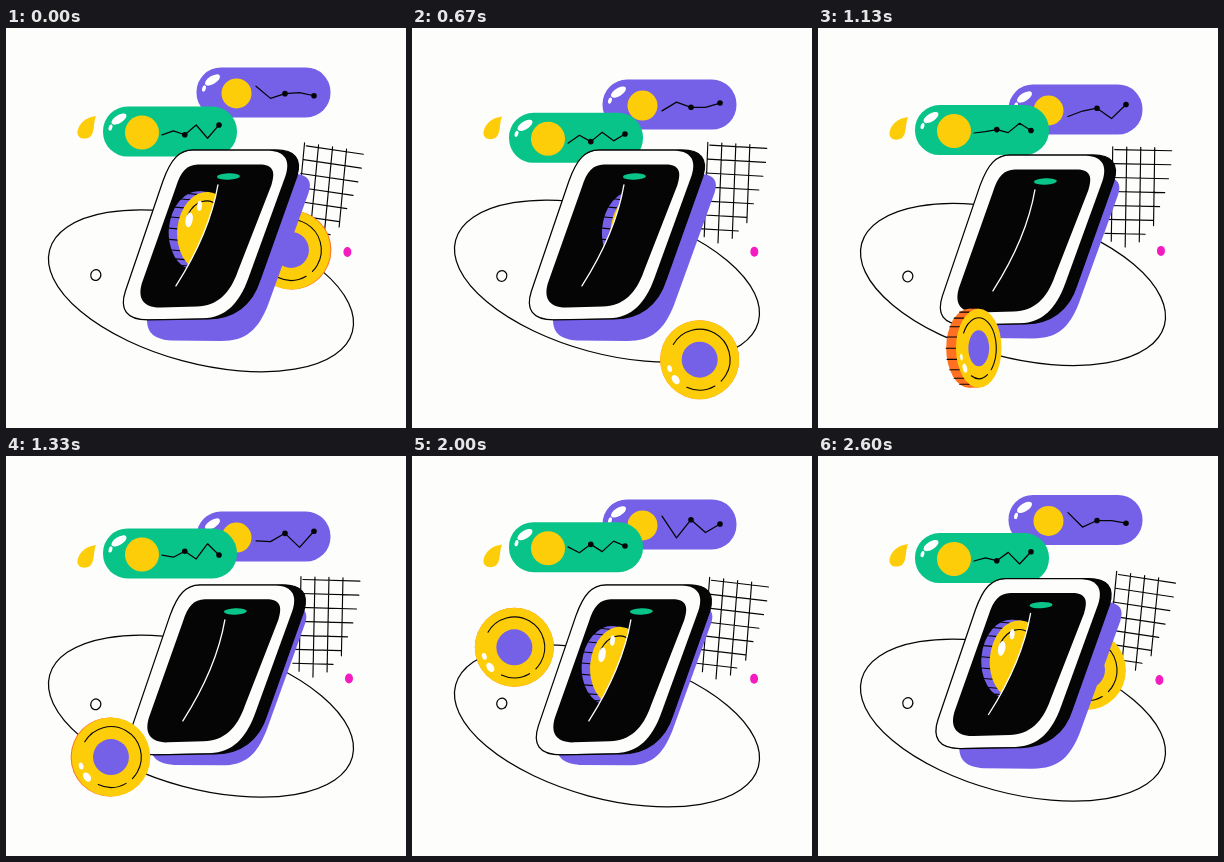
These frames come from a looping animation (400x400 px, 2670 ms). An HTML page with a canvas:

```html
<!DOCTYPE html>
<html lang="en">
<head>
<meta charset="utf-8">
<title>Coin orbit</title>
<style>
  html, body { margin: 0; width: 100%; height: 100%; overflow: hidden; background: #fdfdfc; }
  canvas { display: block; width: 400px; height: 400px; }
</style>
</head>
<body>
<canvas id="stage"></canvas>
<script>
const LOOP = 2670, STEPS = 40, TAU = Math.PI * 2;
const WHITE = '#fdfdfc', INK = '#050505', YELLOW = '#fecd0a', ORANGE = '#ff7022',
      PURPLE = '#7561e8', GREEN = '#08c488', PINK = '#f21cc0';

const canvas = document.getElementById('stage');
const dpr = window.devicePixelRatio || 1;
canvas.width = canvas.height = 400 * dpr;
const ctx = canvas.getContext('2d');
const rad = deg => deg * Math.PI / 180;

// Swings `cycles` times per loop, +1 at step `peak`
const wave = (k, peak, cycles = 1) => Math.cos((k - peak) / STEPS * TAU * cycles);

const shapes = {
  drop: 'M90 88.5C80 89.5 72.5 96.5 71.5 104C70.5 111 78.5 113 84 109.5C89 105 87 96 90 88.5Z',
  shadow: 'M290 146C302 147 306.5 153 302.5 165L262 277C252 302 240 313 215 313L165 312.5C150 311.5 141 306 141 292L190 150Z',
  body: 'M187 122H270C289 122 296 131 291 148L254 252C246 278 227 290.5 203 291L142 292C120 292 113.5 281 119.5 263L157 153C165 131 173 122.5 187 122Z',
  front: 'M187 122.5H260C278 122.5 285 131 279.5 148L242.5 250C233 276 220 289 197 290.5L142 291.5C120 291.5 114 281 119.5 263L157 153C165 131 173 123 187 122.5Z',
  screen: 'M192 136.5H252C267 136 270 143 265.5 157L232 243C224 266 211 278 191 278.5L155 279.5C137 280 131.5 270 136 255L170 159C175 143 181 137 192 136.5Z',
  slot: 'M212 157C207 186 193 222 170 258',
  slotLeft: 'M212 157C207 186 193 222 170 258L120 270V150Z'
};
for (const name in shapes) shapes[name] = new Path2D(shapes[name]);

function fill(path, color) { ctx.fillStyle = color; ctx.fill(path); }

function oval(x, y, rx, ry, color, turn = 0) {
  ctx.beginPath();
  ctx.ellipse(x, y, rx, ry, rad(turn), 0, TAU);
  ctx.fillStyle = color;
  ctx.fill();
}

function stroke(path, color = INK, width = 1.25) {
  ctx.strokeStyle = color;
  ctx.lineWidth = width;
  path ? ctx.stroke(path) : ctx.stroke();
}

function line(x0, y0, x1, y1) { ctx.moveTo(x0, y0); ctx.lineTo(x1, y1); }

function group(draw) { ctx.save(); draw(); ctx.restore(); }

// Each vertex bobs, lagging behind the one before it
function chart(k, top, { x, end, count, level, amp, peak, lag }) {
  const last = count - 1;
  const pts = Array.from({ length: count }, (_, i) => {
    const dot = i === 2 || i === last;
    const swing = (dot ? 4.3 : amp(i)) * wave(k, peak + lag * i);
    return [x + (end - x) * i / last, top + level(i) + swing, dot];
  });
  ctx.beginPath();
  pts.forEach(([px, py]) => ctx.lineTo(px, py));
  stroke();
  for (const [px, py, dot] of pts) if (dot) oval(px, py, 2.8, 2.8, INK);
}

function pill(k, x, y, color, markX, markR, trend) {
  ctx.beginPath();
  ctx.roundRect(x, y, 134, 50, 24.5);
  ctx.fillStyle = color;
  ctx.fill();
  oval(x + 16, y + 12.5, 8.5, 4, '#fff', -32);
  oval(x + 7.5, y + 21, 1.8, 3.2, '#fff', 15);
  oval(markX, y + 26, markR, markR, YELLOW);
  chart(k, y, trend);
}

const purpleTrend = {
  x: 250, end: 308, count: 5, peak: 14, lag: 16.3,
  level: i => i % 2 ? 30.5 : 24, amp: i => 9 - i
};
const greenTrend = {
  x: 156, end: 213, count: 6, peak: 8, lag: 18.8,
  level: i => 27.5 - i, amp: i => 3 + 1.6 * i
};

function gloss(x, y, size, turn) { oval(x, y, size, size * 1.5, '#fff', turn); }

// A thick disc turning about its vertical axis
function coin(x, y, spin, edge, drawFace) {
  const R = 39.5, T = 12;
  let c = Math.cos(rad(spin)), s = Math.sin(rad(spin));
  if (c < 0) { c = -c; s = -s; }
  const w = Math.max(R * c, 0.5), side = Math.sign(s);
  const faceX = x + s * T / 2, backX = x - s * T / 2;

  oval(backX, y, w, R, edge);
  ctx.fillRect(Math.min(faceX, backX), y - R, Math.abs(s) * T, 2 * R);
  if (Math.abs(s) > 0.3) {
    ctx.beginPath();
    for (let a = -66; a <= 66; a += 16.5) {
      const rim = side * w * Math.cos(rad(a)), ry = y + R * Math.sin(rad(a));
      line(backX - rim, ry, faceX - rim, ry);
    }
    stroke(null, INK, 1.1);
  }
  oval(faceX, y, w, R, YELLOW);
  for (const [from, to] of [[-150, 45], [60, 115]]) {
    ctx.beginPath();
    ctx.ellipse(faceX, y, w * 0.77, R * 0.77, 0, rad(from), rad(to));
    stroke(null, INK, 1.1);
  }
  group(() => {
    ctx.translate(faceX, y);
    ctx.scale(w / R, 1);
    drawFace();
  });
}

function orbitFace() {
  oval(0, 0, 18, 18, PURPLE);
  gloss(-24, 20, 3.4, -35);
  gloss(-30, 9, 2.3, -15);
}

function slotFace() {
  gloss(-24, -10, 5, 12);
  gloss(-11, -25, 3.4, 0);
}

function grid(k) {
  const swing = wave(k, 37);
  group(() => {
    ctx.translate(320, 168 + 4.5 * wave(k, 28));
    ctx.transform(1, Math.tan(rad(5 + 3.8 * swing)), -Math.tan(rad(3.3 + 2.4 * swing)), 1, 0, 0);
    ctx.translate(-320, -168);
    ctx.beginPath();
    for (let i = 0; i < 7; i++) {
      const y = 122.8 + 14 * i;
      line(296 - 1.4 * i, y, 353 - 0.7 * i * i, y);
    }
    for (let i = 0; i < 4; i++) {
      const x = 294 + 14 * i;
      line(x, 120, x, 220 - 5.5 * (i - 1) ** 2);
    }
    stroke(null, INK, 1.15);
  });
}

function phone(k) {
  const swing = wave(k, 25), shift = 3.4 + 4.9 * swing;
  group(() => {
    const size = 0.978 - 0.031 * swing;
    ctx.translate(223, 230);
    ctx.scale(size, size);
    ctx.translate(-223, -230);
    fill(shapes.shadow, PURPLE);
  });
  group(() => {
    ctx.translate(shift, shift);
    fill(shapes.body, INK);
    fill(shapes.front, WHITE);
    stroke(shapes.body);
    fill(shapes.screen, INK);
    group(() => {
      ctx.clip(shapes.screen);
      ctx.clip(shapes.slotLeft);
      ctx.translate(195 + 60 * Math.max(0, wave(k, 17)), 203);
      ctx.rotate(rad(5));
      coin(0, 0, 45, PURPLE, slotFace);
    });
    stroke(shapes.slot, WHITE, 1.3);
    oval(222.5, 148.6, 11.5, 3.2, GREEN, -2);
  });
}

function draw(k) {
  ctx.setTransform(dpr, 0, 0, dpr, 0, 0);
  ctx.fillStyle = WHITE;
  ctx.fillRect(0, 0, 400, 400);
  ctx.lineJoin = ctx.lineCap = 'round';

  const orbitY = 261.5 + 8.5 * wave(k, 31);
  ctx.beginPath();
  ctx.ellipse(195, orbitY, 156.8, 72.4, rad(15.15), 0, TAU);
  stroke();

  grid(k);
  group(() => {
    ctx.translate(0, 0.6 * wave(k, 20));
    fill(shapes.drop, YELLOW);
  });
  ctx.beginPath();
  ctx.ellipse(89.8, 247.7 + 0.7 * wave(k, 18), 5, 5.4, rad(20), 0, TAU);
  stroke();
  oval(342.2 - 0.8 * wave(k, 39), 223.3 + 0.9 * wave(k, 4), 4, 5, PINK);

  pill(k, 190.5, 47.5 + 9 * wave(k, 17), PURPLE, 230.5, 15, purpleTrend);
  pill(k, 97, 75.5 + 9.8 * wave(k, 8), GREEN, 136, 17, greenTrend);

  // The orbiting coin hurries through the near and far sides
  const turn = rad(9 * k - 45.5 - 8.5 * wave(k, 1, 2));
  const spin = -18 * k - 5 * wave(k, 0, 3);
  const orbiter = () => coin(
    195 + 152.5 * Math.cos(turn),
    orbitY + 32 * Math.cos(turn) + 74.4 * Math.sin(turn),
    spin, ORANGE, orbitFace);
  const inFront = k >= 3 && k <= 28;
  if (!inFront) orbiter();
  phone(k);
  if (inFront) orbiter();
}

// Fifteen poses a second, each starting on a 10 ms tick
function poseAt(ms) {
  const k = Math.ceil(ms * 15 / 1000);
  return Math.round(k * 20 / 3) * 10 > ms ? k - 1 : Math.min(k, STEPS - 1);
}

const start = performance.now();
function tick() {
  draw(poseAt((performance.now() - start) % LOOP));
  requestAnimationFrame(tick);
}
tick();
</script>
</body>
</html>
```
